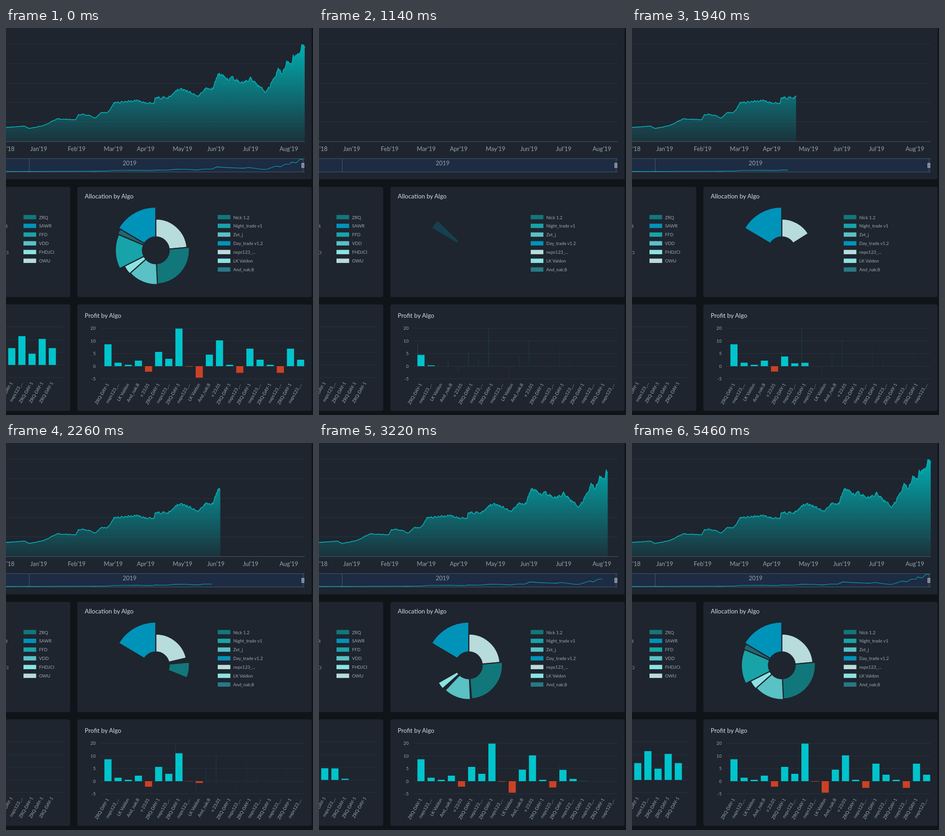
An HTML page for the animation above (7.86 s loop, 667 by 840 pixels).

```html
<!DOCTYPE html>
<html lang="en">
<head>
<meta charset="utf-8">
<title>Trading dashboard</title>
<style>
  html, body { margin: 0; width: 100%; height: 100%; overflow: hidden; background: #0f1419; }
  svg { display: block; width: 667px; height: 840px; font-family: Lato, "Open Sans", sans-serif; }
  .title { font-size: 13.4px; fill: #d3dae0; }
  .axis { font-size: 13px; fill: #98a3ad; }
  .small { font-size: 9.7px; fill: #9da7b0; }
  .crisp { shape-rendering: crispEdges; }
</style>
</head>
<body>
<svg id="stage" viewBox="0 0 667 840"></svg>
<script>
const LOOP = 7860, TICK = 80, BLANK = 500, START = 980;
const PANEL = '#1e252f', GRID = '#25333f', EDGE = '#4a5b70', CYAN = '#00c4cc', RED = '#cc4125', LINE = '#06adb2';
const TEAL = '#12777a', SEA = '#18a3a8', AQUA = '#5ac1c5', BLUE = '#0093ba',
      PALE = '#b8dbdb', MINT = '#8be3e1', SLATE = '#277984';
const stage = document.getElementById('stage');

function add(tag, attrs, parent = stage) {
  const node = document.createElementNS('http://www.w3.org/2000/svg', tag);
  for (const key in attrs) node.setAttribute(key, attrs[key]);
  parent.append(node);
  return node;
}
const box = (x, y, width, height, fill, parent, extra) => add('rect', { x, y, width, height, fill, ...extra }, parent);
const crisp = (x, y, w, h, fill) => box(x, y, w, h, fill, stage, { class: 'crisp' });
function label(str, x, y, cls, anchor = 'start', extra = {}) {
  add('text', { x, y, class: cls, 'text-anchor': anchor, ...extra }).textContent = str;
}
function slanted(str, x, y) {
  label(str, 0, 3.4, 'small', 'end', { transform: `translate(${x} ${y}) rotate(-60)` });
}
const clamp = v => Math.min(1, Math.max(0, v));
const cubicOut = u => 1 - (1 - clamp(u)) ** 3;

let seed = 11;
const noise = () => (seed = seed * 16807 % 2147483647) / 1073741823.5 - 1;

// Panels
for (const [y, h] of [[345, 239], [600, 231]]) {
  box(-20, y, 159.5, h, PANEL, stage, { rx: 4 });
  box(155, y, 509, h, PANEL, stage, { rx: 4 });
}
box(-20, -20, 684, 348.5, PANEL, stage, { rx: 4 });
label('Allocation by Algo', 171, 370, 'title');
label('Profit by Algo', 171, 628.5, 'title');

// Price chart: turning points joined by a rough walk that widens with the price
const FLOOR = 246, PEAK = 36;
const turns = [
  [0, 216], [40, 213], [50, 218], [80, 212], [113, 197], [152, 199], [157, 188], [180, 189], [193, 196],
  [207, 184], [222, 183], [235, 162], [285, 157], [309, 164], [322, 161], [324, 150], [352, 153], [372, 134],
  [395, 136], [418, 148], [432, 132], [450, 131], [461, 100], [475, 107], [518, 118], [531, 108], [562, 138],
  [571, 131], [591, 91], [600, 100], [610, 74], [621, 72], [624, 56], [634, 63], [643, 37], [649, 40]];
function roughWalk() {
  const pts = [];
  let drift = 0;
  turns.slice(1).forEach(([x1, y1], i) => {
    const [x0, y0] = turns[i];
    for (let x = x0; x < x1; x += 1.4) {
      const y = y0 + (y1 - y0) * (x - x0) / (x1 - x0);
      drift = drift * .55 + noise() * (226 - y) / 34;
      pts.push([x, Math.max(PEAK, y + drift)]);
    }
  });
  return [...pts, turns.at(-1)];
}
const toPath = pts => 'M' + pts.map(p => p.map(v => v.toFixed(1)).join()).join('L');

for (const y of [35, 77, 120, 161, 203]) crisp(0, y, 649, 1, GRID);
const defs = add('defs', {});
const gradient = add('linearGradient', { id: 'fade', gradientUnits: 'userSpaceOnUse', x1: 0, x2: 0, y1: PEAK, y2: FLOOR }, defs);
add('stop', { offset: 0, 'stop-color': '#00adb0' }, gradient);
add('stop', { offset: 1, 'stop-color': '#00adb0', 'stop-opacity': .1 }, gradient);
function revealed(id) {
  const clip = add('clipPath', { id }, defs);
  const pane = box(-5, 0, 0, 330, '#000', clip);
  return { group: add('g', { 'clip-path': `url(#${id})` }), show: x => pane.setAttribute('width', Math.max(0, x + 5)) };
}
const price = revealed('priceClip');
const curve = toPath(roughWalk());
add('path', { d: `${curve}V${FLOOR}H0Z`, fill: 'url(#fade)' }, price.group);
add('path', { d: curve, fill: 'none', stroke: LINE, 'stroke-width': 1.7, 'stroke-linejoin': 'round' }, price.group);
crisp(0, FLOOR, 649, 1, EDGE);

label('Dec’18', 18.5, 266.5, 'axis', 'end');
const months = { Jan: 71, Feb: 153.5, Mar: 233, Apr: 303.5, May: 383.5, Jun: 456, Jul: 531.5, Aug: 614.5 };
for (const m in months) label(m + '’19', months[m], 266.5, 'axis', 'middle');

// Range navigator: the same prices, flattened towards the floor
crisp(0, 283, 649, 30, '#1d2b43');
for (const y of [283, 312]) crisp(0, y, 649, 1, EDGE);
for (const x of [50, 645]) crisp(x, 283, 1, 30, EDGE);
label('2019', 268.5, 298, 'axis', 'middle');
const range = revealed('rangeClip');
const flattened = turns.map(([x, y]) => [x * 645 / 649, 311.5 - 27 * ((FLOOR - y) / (FLOOR - PEAK)) ** 2.7]);
add('path', { d: toPath(flattened), fill: 'none', stroke: LINE, 'stroke-width': 1.1 }, range.group);
box(642.5, 293.5, 5, 9.5, '#77828f', stage, { stroke: '#aab2ba', 'stroke-width': 1 });

// Legends
function legend(x, rows) {
  rows.forEach(([name, color], i) => {
    const y = 410.5 + i * 18.95;
    box(x, y - 4.7, 27.5, 9.4, color);
    label(name, x + 33.7, y + 4, 'small');
  });
}
legend(38, [['ZRQ', TEAL], ['SAWR', BLUE], ['FFD', SEA], ['VDD', AQUA], ['FHDJCI', MINT], ['OWU', PALE]]);
legend(460, [['Nick 1.2', TEAL], ['Night_trade v1', SEA], ['Zet_j', AQUA], ['Day_trade v1.2', BLUE],
  ['nxps123_...', PALE], ['LK Valdon', MINT], ['And_nak;8', SLATE]]);
label('SAWR', 3.5, 433.5, 'small', 'end');
label('FHDJCI', 5.5, 490.5, 'small', 'end');

// Pie: angles run clockwise from the top, wider slices take longer to open
const CX = 325.5, CY = 482.5, HOLE = 29, MS_PER_DEGREE = 17, OVERLAP = .42;
const polar = (r, deg) => {
  const a = deg * Math.PI / 180;
  return `${(CX + r * Math.sin(a)).toFixed(2)} ${(CY - r * Math.cos(a)).toFixed(2)}`;
};
const sector = (r, from, to) =>
  `M${polar(r, from)}A${r} ${r} 0 0 1 ${polar(r, to)}L${polar(HOLE, to)}A${HOLE} ${HOLE} 0 0 0 ${polar(HOLE, from)}Z`;
const pie = add('g', {});
let angle = -59.2, opening = 1060;
const slices = [[59.2, 94, BLUE], [84.8, 68, PALE], [92.5, 73, TEAL], [51, 74.5, AQUA],
  [14.9, 76.5, MINT], [49.8, 88, SEA], [7.8, 90, '#21666f']].map(([span, r, fill]) => {
  const slice = { span, r, from: angle, start: opening, time: span * MS_PER_DEGREE,
    node: add('path', { fill, stroke: PANEL, 'stroke-width': 2.4 }, pie) };
  angle += span;
  opening += slice.time * OVERLAP;
  return slice;
});

function drawPie(t) {
  for (const s of slices) {
    const grown = cubicOut((t - s.start) / s.time);
    s.node.setAttribute('d', grown > 0 ? sector(s.r, s.from, s.from + s.span * grown) : '');
  }
  pie.setAttribute('opacity', clamp((t - START) / 640));
}

// Bar charts
[20, 10, 5, 0, -5].forEach((v, i) => {
  const y = 651 + i * 27.5;
  crisp(205, Math.round(y), 444, 1, GRID);
  label(v, 194.8, y + 4.2, 'small', 'end');
  crisp(0, Math.round(y - 3), 125, 1, GRID);
});

const STEP = 22.03, LAG = 144, GROW = 490;
const bars = [];
function barChart(left, base, start, heights, names, nameY) {
  heights.forEach((height, i) => {
    const x = left + i * STEP, size = Math.abs(height), color = height > 0 ? CYAN : RED;
    const hint = box(x, height > 0 ? base - size : base, 1, size, color, stage, { class: 'crisp' });
    bars.push({ node: box(x, base, 15.5, 0, color), hint, base, height, start: start + i * LAG, faint: Math.max(0, .27 - i * .014) });
    slanted(names[i], x + 7.2, nameY);
  });
}
const CODE = 'ZRQ-DAY-1', NX = 'nxps123_...';
const pair = [CODE, NX], team = [...pair, 'LK Valdon', 'And_nak;8', 'v 23.01'];
const cycle = [3, -14.5, 38, 14];
barChart(213.8, 734, 888, [47.5, 7.5, 3, 12, -12, 31, 16, 81.5, -1, -25, 25, 56, ...cycle, ...cycle],
  [...team, ...pair, ...team, ...pair, ...pair, ...pair, ...pair], 772);
barChart(4.8, 731.3, 2880, [36.5, 62.5, 24.5, 56.5, 36.5], [CODE, NX, CODE, CODE, CODE], 769);

function drawBars(t) {
  for (const b of bars) {
    const grown = clamp((t - b.start) / GROW), size = Math.abs(b.height) * grown;
    b.node.setAttribute('y', b.height > 0 ? b.base - size : b.base);
    b.node.setAttribute('height', size);
    b.hint.setAttribute('opacity', t >= START && grown < 1 && b.base > 733 ? b.faint : 0);
  }
}

// Distance left to the right edge shrinks with the cube of the time left
const reach = (edge, rate, end, t) => edge - (rate * Math.max(0, end - t)) ** 3;

function render(time) {
  let t = Math.floor((time - 20) / TICK) * TICK + 20;
  if (t < BLANK) t = LOOP;
  else if (t < START) t = 0;
  price.show(reach(650, .00298, 4170, t));
  range.show(reach(645, .00288, 4280, t));
  drawPie(t);
  drawBars(t);
}

const origin = performance.now();
function frame() {
  render((performance.now() - origin) % LOOP);
  requestAnimationFrame(frame);
}
frame();
</script>
</body>
</html>
```
